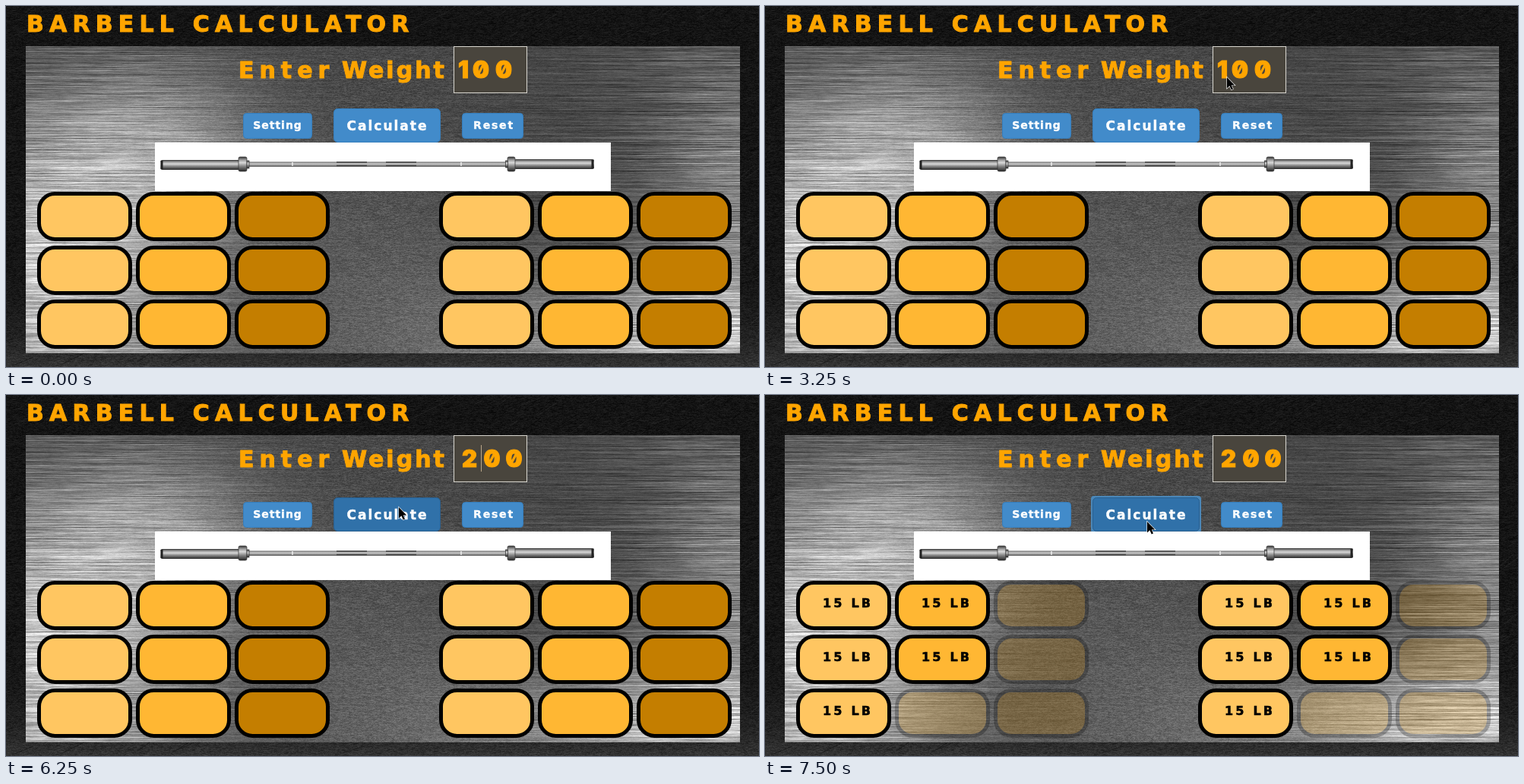
Animation, 991 px wide and 476 px high, one loop 8000 ms. Source, as an HTML page with a canvas:

```html
<!DOCTYPE html>
<html lang="en">
<head>
<meta charset="utf-8">
<title>Barbell Calculator</title>
<style>
  html, body { margin: 0; width: 100%; height: 100%; overflow: hidden; background: #161616; }
  canvas, svg { position: absolute; left: 0; top: 0; display: block; }
  text { font-family: "DejaVu Sans", sans-serif; font-weight: bold; white-space: pre; }
  .gold { fill: #ffa500; stroke: #ffa500; stroke-width: 1; font-size: 30px; }
  .digits { font-family: Inter, sans-serif; font-weight: 900; font-size: 31px; font-feature-settings: "zero"; text-anchor: middle; }
  .button rect { fill: #428bca; stroke: #357ebd; }
  .button text { fill: #fff; stroke: #fff; stroke-width: .4; font-size: 14px; text-anchor: middle; }
  .button.hover rect { fill: #3071a9; stroke: #285e8e; }
  .plate rect { stroke: #000; stroke-width: 5; }
  .plate text { font-size: 16px; letter-spacing: 3.2px; stroke: #000; stroke-width: .5; visibility: hidden; }
  .loaded .used text { visibility: visible; }
  .loaded .spare { opacity: .25; }
</style>
</head>
<body>
<canvas id="metal" width="991" height="476"></canvas>
<svg width="991" height="476" viewBox="0 0 991 476">
  <defs>
    <linearGradient id="steel" x2="0" y2="1">
      <stop offset="0" stop-color="#333"/>
      <stop offset=".2" stop-color="#999"/>
      <stop offset=".4" stop-color="#d8d8d8"/>
      <stop offset=".65" stop-color="#858585"/>
      <stop offset="1" stop-color="#262626"/>
    </linearGradient>
    <linearGradient id="shaft" x2="0" y2="1">
      <stop offset="0" stop-color="#666"/>
      <stop offset=".4" stop-color="#ccc"/>
      <stop offset="1" stop-color="#555"/>
    </linearGradient>
  </defs>

  <text class="gold" x="27" y="34" letter-spacing="7.2">BARBELL CALCULATOR</text>
  <text class="gold" y="95"><tspan x="306" letter-spacing="7">Enter </tspan><tspan x="442" letter-spacing="3">Weight</tspan></text>

  <rect x="589.5" y="53.5" width="96" height="61" fill="#49453d" stroke="#d8d6cf"/>
  <text id="weight" class="gold digits" y="95"></text>
  <rect id="caret" y="66" width="1" height="35" fill="#b9a588"/>

  <g class="button">
    <rect x="312.5" y="141.5" width="90" height="33" rx="4"/>
    <text x="357.5" y="162" letter-spacing="1">Setting</text>
  </g>
  <rect id="focus" x="431" y="135" width="141" height="45" rx="2" fill="none" stroke="#4a87b9" stroke-width="4"/>
  <g class="button" id="calculate">
    <rect x="431.5" y="135.5" width="140" height="44" rx="5"/>
    <text x="502" y="163.5" letter-spacing="2" style="font-size:17px">Calculate</text>
  </g>
  <g class="button">
    <rect x="600.5" y="141.5" width="80" height="33" rx="4"/>
    <text x="642" y="162" letter-spacing="1.8">Reset</text>
  </g>

  <rect x="196" y="180" width="600" height="64" fill="#fff"/>
  <rect x="316" y="205.5" width="346" height="6.5" fill="url(#shaft)"/>
  <g fill="url(#steel)">
    <rect x="203.5" y="203" width="104" height="13" rx="2"/>
    <rect x="669" y="202" width="105" height="13" rx="2"/>
    <g stroke="#333" stroke-width=".7">
      <rect x="306" y="199" width="11" height="19" rx="2"/>
      <rect x="317" y="204" width="3" height="10"/>
      <rect x="660" y="199" width="10" height="19" rx="2"/>
      <rect x="657.5" y="204" width="3" height="9"/>
    </g>
  </g>
  <path d="M435 206H475M435 210.5H475M500 206H540M500 210.5H540" stroke="#444" stroke-width="1.5"/>
  <path d="M377 206V211M599 206V211" stroke="#eee" stroke-width="1.5"/>
  <path d="M205 204V215M772 203V214" stroke="#222" stroke-width="3"/>

  <g id="plates"></g>
  <path id="pointer" d="M0 0V14.5L3.4 11.3 5.7 16.5 8 15.5 5.8 10.4H10.2Z" stroke="#fff" stroke-width="1.2" paint-order="stroke"/>
</svg>
<script>
const $ = id => document.getElementById(id);

let seed = 7;
const random = () => (seed = (seed * 16807) % 2147483647) / 2147483647;

const ctx = $('metal').getContext('2d');

// Paints grey noise; `brush` sets how strongly long horizontal streaks replace fine grain.
function grain(left, top, width, height, amount, tone, brush) {
  const image = ctx.createImageData(width, height);
  let offset = 0;
  for (let y = 0; y < height; y++) {
    let fine = 0, streak = (random() - .5) * 2;
    for (let x = 0; x < width; x++) {
      fine = fine * .5 + random() - .5;
      streak = streak * .985 + (random() - .5) * .35;
      const base = tone(left + x, top + y), mix = brush(left + x);
      const value = base + amount * (.5 + base / 180) * (fine * (1 - mix) + streak * mix);
      image.data.fill(value, offset, offset + 3);
      image.data[offset + 3] = 255;
      offset += 4;
    }
  }
  ctx.putImageData(image, left, top);
}

const glow = (x, y, cx, cy, rx, ry) => Math.exp(-(((x - cx) / rx) ** 2) - ((y - cy) / ry) ** 2);

function scratches(count) {
  for (let i = 0; i < count; i++) {
    const x = random() * 991, y = random() * 476, length = 8 + random() * 35;
    ctx.strokeStyle = random() < .5 ? 'rgba(0,0,0,.4)' : 'rgba(90,90,90,.2)';
    ctx.beginPath();
    ctx.moveTo(x, y);
    ctx.lineTo(x + length, y - length * (.3 + random() * .6));
    ctx.stroke();
  }
}

grain(0, 0, 991, 476, 26, (x, y) => 20 + 32 * (y / 476) ** 9, () => 0);
scratches(700);
grain(26, 53, 940, 405, 30, (x, y) =>
  70 + 130 * glow(x, y, 50, 350, 190, 210)
     + 60 * glow(x, y, 210, 190, 130, 120)
     + 20 * glow(x, y, 490, 400, 180, 200)
     + 110 * glow(x, y, 900, 445, 260, 90)
     + 65 * glow(x, y, 980, 250, 130, 190),
  x => Math.min(.9, Math.abs(x - 496) / 420));

// Plates fill column by column; five of nine on each side get loaded.
const shades = ['#ffc661', '#ffb733', '#c47e00'];
let plates = '';
for (const side of [41, 570])
  for (let column = 0; column < 3; column++)
    for (let row = 0; row < 3; row++) {
      const used = column * 3 + row < 5;
      plates += `<g class="plate ${used ? 'used' : 'spare'}" transform="translate(${side + column * 130} ${245 + row * 71})">
        <rect x="2.5" y="2.5" width="120" height="60" rx="21" fill="${shades[column]}"/>
        <text x="35" y="35">15 LB</text></g>`;
    }
$('plates').innerHTML = plates;

const digitSpots = { '100': '602 625 655', '00': '610 640', '200': '610 639.5 668.5' };

const pointerSteps = [
  [0, null], [750, [432, 44]], [1000, [453, 125]], [1500, [459, 136]], [1750, [468, 140]],
  [2000, [479, 147]], [2250, [486, 152]], [2500, [492, 155]], [2750, [588, 125]],
  [3000, [621, 109]], [3250, [608, 94]], [4000, [607, 90]], [6250, [517, 148]], [6500, [503, 167]]
];
const weightSteps = [[0, '100'], [5250, '00'], [5500, '200']];
const caretSteps = [[0, null], [4500, 610], [4750, null], [5250, 595], [5500, 625], [6000, null], [6250, 625], [6750, null]];

const at = (steps, time) => steps.findLast(([start]) => start <= time)[1];
const show = (element, visible) => element.style.visibility = visible ? 'visible' : 'hidden';

function draw(time) {
  const point = at(pointerSteps, time);
  show($('pointer'), point);
  if (point) $('pointer').setAttribute('transform', `translate(${point})`);

  const weight = at(weightSteps, time);
  $('weight').textContent = weight;
  $('weight').setAttribute('x', digitSpots[weight]);

  const caret = at(caretSteps, time);
  show($('caret'), caret);
  if (caret) $('caret').setAttribute('x', caret);

  $('calculate').classList.toggle('hover', time >= 6250);
  show($('focus'), time >= 7000);
  $('plates').classList.toggle('loaded', time >= 7250);
}

const begin = performance.now();
function tick() {
  draw((performance.now() - begin) % 8000);
  requestAnimationFrame(tick);
}
tick();
</script>
</body>
</html>
```
